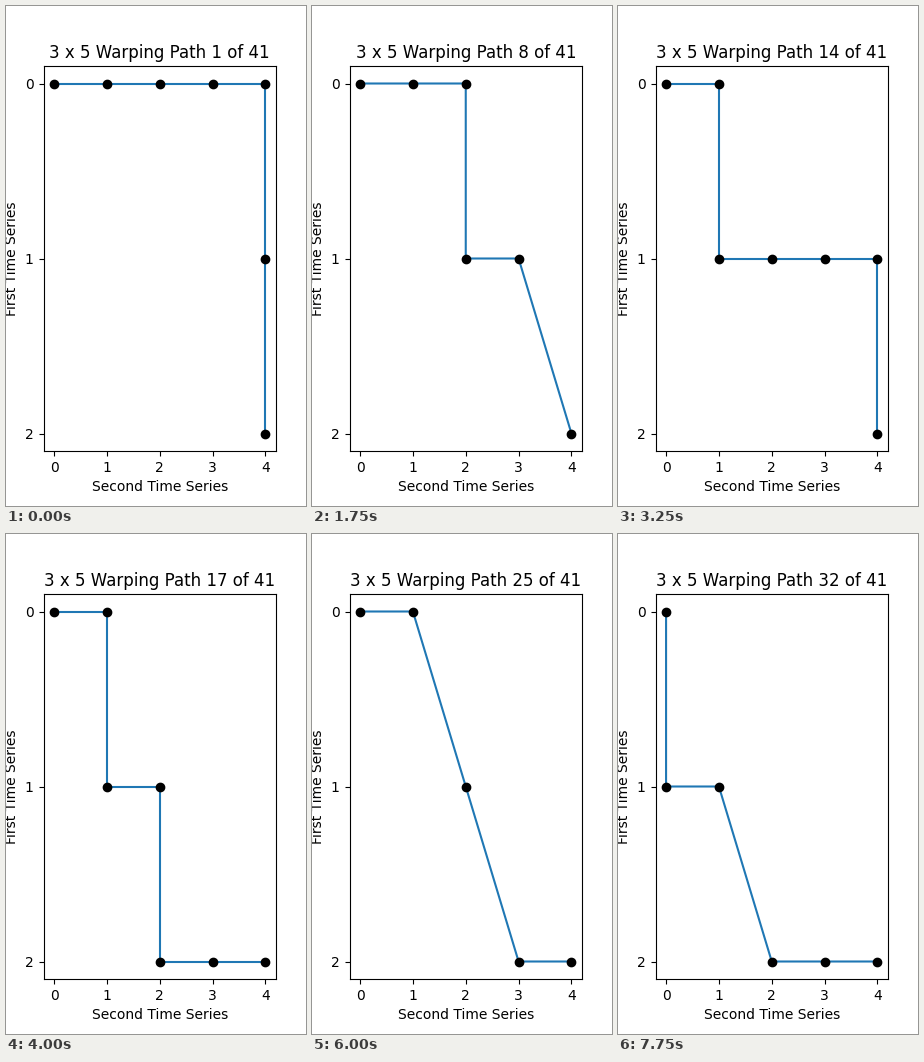
These frames come from a looping animation (300x500 px, 8000 ms). A matplotlib script:

```python
import matplotlib.pyplot as plt
from matplotlib.animation import FuncAnimation

ROWS, COLS = 3, 5
FRAMES = 32
STEPS = [(0, 1), (1, 0), (1, 1)]  # right, down, diagonal


def warping_paths(row=0, col=0):
    """Yield every path from (row, col) to the far corner, depth first."""
    if (row, col) == (ROWS - 1, COLS - 1):
        yield [(row, col)]
        return
    for down, right in STEPS:
        r, c = row + down, col + right
        if r < ROWS and c < COLS:
            for rest in warping_paths(r, c):
                yield [(row, col)] + rest


paths = list(warping_paths())

fig, ax = plt.subplots(figsize=(3, 5), dpi=100)
line, = ax.plot([0, COLS - 1], [0, ROWS - 1], color="C0")
dots, = ax.plot([0, COLS - 1], [0, ROWS - 1], "ko")
ax.set_xticks(range(COLS))
ax.set_yticks(range(ROWS))
ax.invert_yaxis()
ax.set_xlabel("Second Time Series")
ax.set_ylabel("First Time Series")
title = ax.set_title("")


def draw(i):
    rows, cols = zip(*paths[i])
    line.set_data(cols, rows)
    dots.set_data(cols, rows)
    title.set_text(f"{ROWS} x {COLS} Warping Path {i + 1} of {len(paths)}")
    return line, dots, title


anim = FuncAnimation(fig, draw, frames=FRAMES, interval=250,
                     repeat=True, repeat_delay=0)
plt.show()
```
